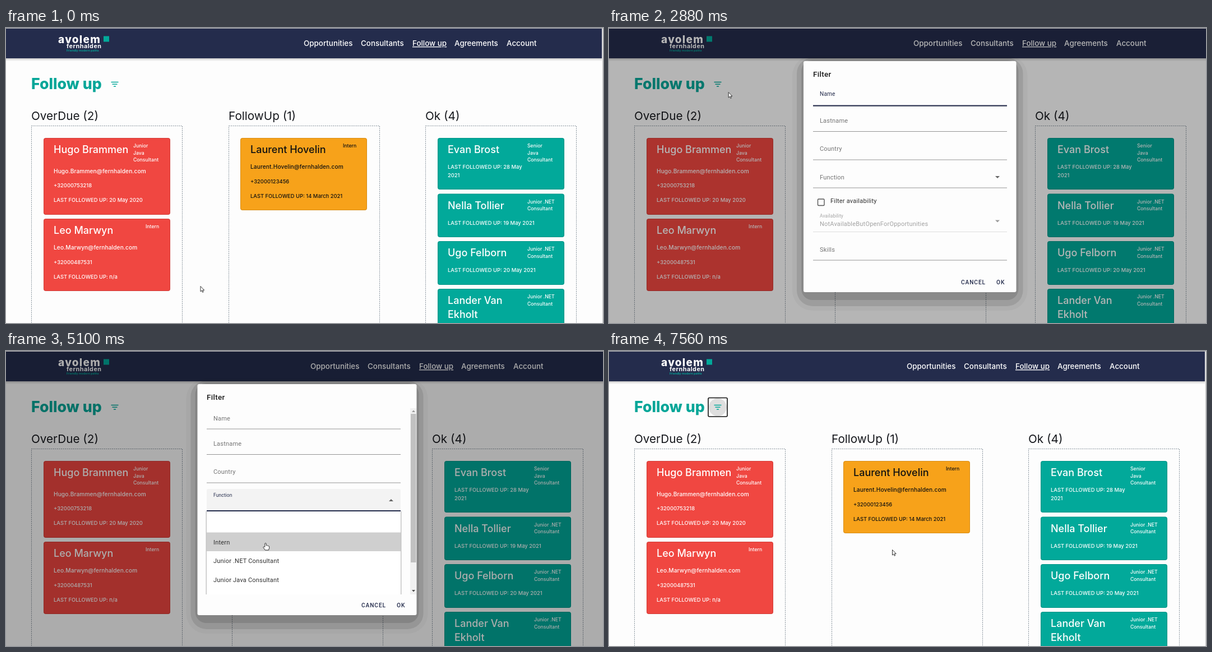
Animation, 1065 px wide and 526 px high, one loop 8 s. Source, as an HTML page:

```html
<!DOCTYPE html>
<html lang="en">
<head>
<meta charset="utf-8">
<title>Follow up</title>
<style>
html, body { margin: 0; width: 100%; height: 100%; overflow: hidden; background: #fdfdfd }
svg { display: block; width: 1065px; height: 526px }
text { font-family: Inter, sans-serif; white-space: pre }
.nav { font-size: 13.4px; font-weight: 500; fill: #fff }
.on { text-decoration: underline }
.page { font-size: 26.7px; font-weight: 800; fill: #05a698 }
.col { font-size: 20.7px; fill: #16181d }
.name { font-size: 18px; font-weight: 500 }
.role { font-size: 8.7px; font-weight: 500 }
.mail { font-size: 10.2px; font-weight: 500; letter-spacing: .08px }
.info { font-size: 9.4px; font-weight: 500 }
#dialog text { font-family: Roboto, sans-serif; font-size: 11px; letter-spacing: .2px; fill: #757575 }
#dialog .title { font-size: 13.5px; font-weight: 500; letter-spacing: .3px; fill: #1c1c1c }
#dialog .dark { fill: #303030 }
#dialog .pale { fill: #a2a2a2 }
#dialog .tiny { font-size: 8.3px }
#dialog .btn { font-size: 10.2px; font-weight: 500; letter-spacing: .9px; fill: #242c4c }
</style>
</head>
<body>
<svg viewBox="0 0 1065 526">
  <defs>
    <linearGradient id="fade" x2="0" y2="1">
      <stop stop-color="#000" stop-opacity=".2"/><stop offset="1" stop-color="#000" stop-opacity="0"/>
    </linearGradient>
    <clipPath id="list"><path d="M355 286H713V434H355Z"/></clipPath>
  </defs>
  <g id="page"></g>
  <rect id="scrim" y="1" width="1065" height="525"/>
  <g id="dialog"></g>
  <path d="M0 .5H1065" stroke="#bcbcbc"/>
  <path id="arrow" d="M.5 .5V10L2.7 8 4.2 11.3 5.7 10.6 4.3 7.4H7.2Z" fill="#fff" stroke="#222" stroke-width=".9"/>
  <path id="hand" d="M-1.2 7.5V1.2Q0 -.3 1.2 1.2V4.8Q2.4 4 3.4 5.2 4.6 4.6 5.2 5.8 6.4 5.5 6.6 6.8V9.6L5.4 13H-.6L-4 8.4Q-4.2 6.6 -2.4 7Z" fill="#fff" stroke="#222" stroke-width=".9"/>
</svg>
<script>
const LOOP = 8000, NAVY = '#242c4c', TEAL = '#02a99a', RED = '#f04741', AMBER = '#f7a21a'
const $ = id => document.getElementById(id)
const text = (cls, x, y, s, more = '') => `<text class="${cls}" x="${x}" y="${y}" ${more}>${s}</text>`
const rect = (x, y, w, h, fill, more = '') =>
  `<rect x="${x}" y="${y}" width="${w}" height="${h}" fill="${fill}" ${more}/>`
const line = (y, color, more = '') => `<path d="M364 ${y}H710" stroke="${color}" ${more}/>`
const group = (id, body, more = '') => `<g id="${id}" ${more}>${body}</g>`

// lines: [class, offset from card top, text]
function card(x, y, h, fill, name, roles, roleX, lines) {
  const ink = fill === AMBER ? '#111' : '#fff'
  return `<g fill="${ink}">` + rect(x, y, 226, h, fill, 'rx="4"') +
    rect(x + .5, y + .5, 225, h - 1, 'none', 'rx="3.5" stroke="#000" stroke-opacity=".125"') +
    name.split('|').map((s, i) => text('name', x + 18, y + 27 + i * 25, s)).join('') +
    roles.split('|').map((s, i) => text('role', x + roleX, y + 17.3 + i * 12.3, s)).join('') +
    lines.map(([cls, dy, s]) => text(cls, x + 18, y + dy, s)).join('') + '</g>'
}
const column = (x, title) => text('col', x, 164, title) +
  rect(x + .5, 174.5, 269, 400, 'none', 'stroke="#84909a" stroke-dasharray="2 1.5"')
const contact = (dy, mail, phone, date) =>
  [['mail', dy, mail + '@fernhalden.com'], ['info', dy + 25.7, phone], ['info', dy + 51.5, 'LAST FOLLOWED UP: ' + date]]
const seen = (date, rest) => [['info', 55, 'LAST FOLLOWED UP: ' + date], ['info', 70, rest || '']]

$('page').innerHTML =
  rect(0, 0, 1065, 526, '#fdfdfd') + rect(0, 54, 1065, 5, 'url(#fade)') + rect(0, 1, 1065, 53, NAVY) +
  group('strip', rect(1063, 1, 2, 525, '#f1f1f1') + '<path d="M1064.5 1V526" stroke="#cfcfcf"/>') +
  text('', 93, 26.5, 'avolem', 'fill="#fff" font-size="19" font-weight="800" letter-spacing="1.3"') +
  text('', 108, 36, 'fernhalden', 'fill="#fff" font-size="10.8" font-weight="700" letter-spacing=".5"') +
  text('', 108, 42.3, 'Friendly modern paths', `fill="${TEAL}" font-size="5.3" font-weight="600"`) +
  rect(174, 14.5, 10, 10, TEAL) +
  group('menu', [[531, 'Opportunities'], [633, 'Consultants'], [725, 'Follow up'], [800, 'Agreements'], [893, 'Account']]
    .map(([x, s]) => text(x === 725 ? 'nav on' : 'nav', x, 32, s)).join('')) +
  text('page', 45, 109, 'Follow up') +
  group('focus', '<circle id="ripple" cx="194" cy="100.3" r="16"/>' +
    rect(177, 83.5, 34, 33.5, 'none', 'rx="2" stroke="#101010" stroke-width="1.6"')) +
  `<path d="M187.5 96.5H200.5M189.5 100.3H198.5M192 104H196" stroke="${TEAL}" stroke-width="1.5"/>` +
  column(45, 'OverDue (2)') +
  card(67, 196, 137, RED, 'Hugo Brammen', 'Junior|Java|Consultant', 160, contact(62.5, 'Hugo.Brammen', '+32000753218', '20 May 2020')) +
  card(67, 340, 129, RED, 'Leo Marwyn', 'Intern', 182, contact(55, 'Leo.Marwyn', '+32000487531', 'n/a')) +
  group('mid', column(397, 'FollowUp (1)') +
    card(418, 196, 129, AMBER, 'Laurent Hovelin', 'Intern', 183, contact(55, 'Laurent.Hovelin', '+32000123456', '14 March 2021'))) +
  group('right', column(748, 'Ok (4)') +
    card(770, 196, 92, TEAL, 'Evan Brost', 'Senior|Java|Consultant', 160, seen('28 May', '2021')) +
    card(770, 295.5, 77.5, TEAL, 'Nella Tollier', 'Junior .NET|Consultant', 160, seen('19 May 2021')) +
    card(770, 380, 78, TEAL, 'Ugo Felborn', 'Junior .NET|Consultant', 160, seen('20 May 2021')) +
    card(770, 465, 100, TEAL, 'Lander Van|Ekholt', 'Junior .NET|Consultant', 160, []))

const GREY = '#949494'
const down = (y, fill) => `<path d="M689 ${y}h8l-4 4Z" fill="${fill}"/>`
// shadow rings: side, bottom, opacity
const bands = [[20, 33, .03], [12, 25, .1], [4, 14, .12]]
$('dialog').innerHTML =
  bands.map(([side, low, a]) => rect(0, 59 - side / 2, 0, 412 + side / 2 + low, '#000', `class="box" data-pad="${side}" rx="${side + 16}" opacity="${a}"`)).join('') +
  rect(0, 59, 0, 412, '#fff', 'id="panel" class="box" data-pad="0" rx="3"') +
  group('form',
    text('title', 364, 87, 'Filter') +
    '<text id="nameLabel">Name</text>' + line(139, GREY) + line(138.5, NAVY, 'id="nameLine" stroke-width="2"') +
    `<path id="caret" d="M376.5 115V128.5" stroke="${NAVY}"/>` +
    text('', 376, 169, 'Lastname') + line(184.5, GREY) +
    text('', 376, 219, 'Country') + line(235, GREY) +
    rect(364, 246, 346, 39, '#eee', 'id="fill" rx="3"') +
    '<text id="funcLabel">Function</text>' + line(285, GREY) + line(285, NAVY, 'id="funcLine" stroke-width="1.8"') +
    text('dark', 376, 274.5, 'Intern', 'id="value"') +
    '<path id="tick" d="M689 264h8l-4 4Z" fill="#666"/>' +
    rect(372.5, 305, 11.5, 11.5, 'none', 'rx="1.5" stroke="#555" stroke-width="1.4"') +
    text('dark', 395, 312, 'Filter availability') +
    text('pale tiny', 376, 338, 'Availability') + text('pale', 376, 353, 'NotAvailableButOpenForOpportunities') +
    down(342.5, '#9a9a9a') + line(363.5, '#dedede') +
    text('', 376, 399, 'Skills') + line(414, GREY) +
    group('options',
      rect(362, 286, 350, 150, '#000', 'opacity=".1"') + rect(363, 286, 348, 150, '#000', 'opacity=".14"') +
      rect(364, 286, 346, 150, '#fff') + rect(364, 323.5, 346, 33.5, '#cfcfcf', 'id="pick"') +
      ['Intern', 'Junior .NET Consultant', 'Junior Java Consultant'].map((s, i) => text('dark', 376, 344.5 + i * 33.7, s)).join(''),
      'clip-path="url(#list)"') +
    group('bar', rect(727, 102, 11, 332, '#f1f1f1') + rect(728, 112, 9.5, 265, '#c1c1c1') +
      '<path d="M730 109h6l-3-3.5Z" fill="#9a9a9a"/><path d="M730 426h6l-3 3.5Z" fill="#505050"/>')) +
  group('foot', rect(676, 440.5, 45, 25, '#bdbdbd', 'id="okFocus" rx="2" stroke="#222" stroke-width="1.6"') +
    text('btn', 628, 457, 'CANCEL') + text('btn', 691, 457, 'OK'))

const ramp = (t, a, b) => Math.min(1, Math.max(0, (t - a) / (b - a)))
const set = (id, attrs) => { for (const k in attrs) $(id).setAttribute(k, attrs[k]) }
const show = (id, on) => set(id, { visibility: on ? 'inherit' : 'hidden' })
const move = (id, x, y = 0) => set(id, { transform: `translate(${x} ${y})` })

// keys: [time, ...values], linear between neighbours
function track(t, keys) {
  const i = keys.findIndex(k => k[0] > t)
  if (i < 0) return keys[keys.length - 1].slice(1)
  if (!i) return keys[0].slice(1)
  const a = keys[i - 1], b = keys[i], p = ramp(t, a[0], b[0])
  return a.slice(1).map((v, j) => v + (b[j + 1] - v) * p)
}
const pointer = [[930, 346.5, 460], [1660, 305, 217], [1720, 283, 187], [1760, 283, 187], [2310, 181.5, 101],
  [2770, 181.5, 101], [3270, 322, 160], [3820, 457, 267], [4580, 457, 267], [4910, 463, 342], [5450, 463, 342],
  [6250, 697, 447], [6600, 697, 447], [6710, 588, 377], [6819, 588, 377], [6820, 527, 350], [7130, 527, 350], [7560, 505, 354]]
// dialog opacity, scale, scrim opacity
const fades = [[2600, 0, .7, 0], [2660, .44, .908, .075], [2769, .44, .908, .075], [2830, 1, 1, .2], [2900, 1, 1, .32],
  [6460, 1, 1, .32], [6500, .4, 1, .095], [6599, .4, 1, .095], [6640, 0, 1, 0]]

function label(id, y, p, focused) {
  set(id, { transform: `translate(376 ${y - 10 * p}) scale(${1 - .24 * p})`, style: `fill:${focused ? NAVY : '#757575'}` })
}

function draw(t) {
  const [alpha, scale, dim] = track(t, fades), [x, y] = track(t, pointer)
  const locked = t >= 2600 && t < 6490, wide = t >= 4060 && t < 5330
  const closing = t >= 6490, naming = t >= 2830 && t < 4060, choosing = t >= 4060 && t < 6300

  show('strip', !locked)
  move('menu', locked ? 12 : 0)
  move('mid', locked ? 6 : 0)
  move('right', locked ? 12 : 0)
  show('focus', t >= 2510 && t < 2830 || t >= 6640)
  set('ripple', { r: 16 * (t < 2600 ? ramp(t, 2490, 2600) : 1), opacity: t < 6000 ? .2 : .12 })

  set('scrim', { opacity: dim })
  show('dialog', alpha > 0)
  set('dialog', { opacity: alpha, transform: `translate(${closing ? -6 : 0} 0) translate(536.5 265) scale(${scale}) translate(-536.5 -265)` })
  for (const box of document.querySelectorAll('.box')) {
    const pad = +box.dataset.pad
    box.setAttribute('x', (wide ? 341.5 : 347) - pad)
    box.setAttribute('width', (wide ? 391 : 379.5) + 2 * pad)
  }
  set('panel', { fill: closing ? '#e6e6e6' : '#fdfdfd' })
  move('form', wide ? -6 : 0)
  move('foot', wide ? 6 : 0)

  label('nameLabel', 124, ramp(t, 2830, 2980) - ramp(t, 4060, 4200), naming)
  label('funcLabel', 270, ramp(t, 4060, 4200), choosing)
  show('nameLine', naming)
  show('caret', naming && t >= 2980 && (t - 2730) % 1060 < 530)
  show('funcLine', choosing)
  show('fill', t >= 3700 && t < 6300)
  set('fill', { fill: choosing ? '#f3f3f3' : '#eee' })
  show('value', t >= 5330)
  set('tick', { transform: wide ? 'rotate(180 693 266)' : '' })
  show('options', wide)
  set('options', { opacity: ramp(t, 4060, 4180) - ramp(t, 5250, 5330) })
  show('pick', wide && t >= 5100)
  show('bar', wide)
  show('okFocus', t >= 6300)

  const hand = t >= 3700 && t < 5600 || t >= 6150 && t < 6600
  show('hand', hand)
  show('arrow', !hand)
  move('hand', x, y)
  move('arrow', x, y)
}

const start = performance.now()
function tick() {
  draw((performance.now() - start) % LOOP)
  requestAnimationFrame(tick)
}
tick()
</script>
</body>
</html>
```
